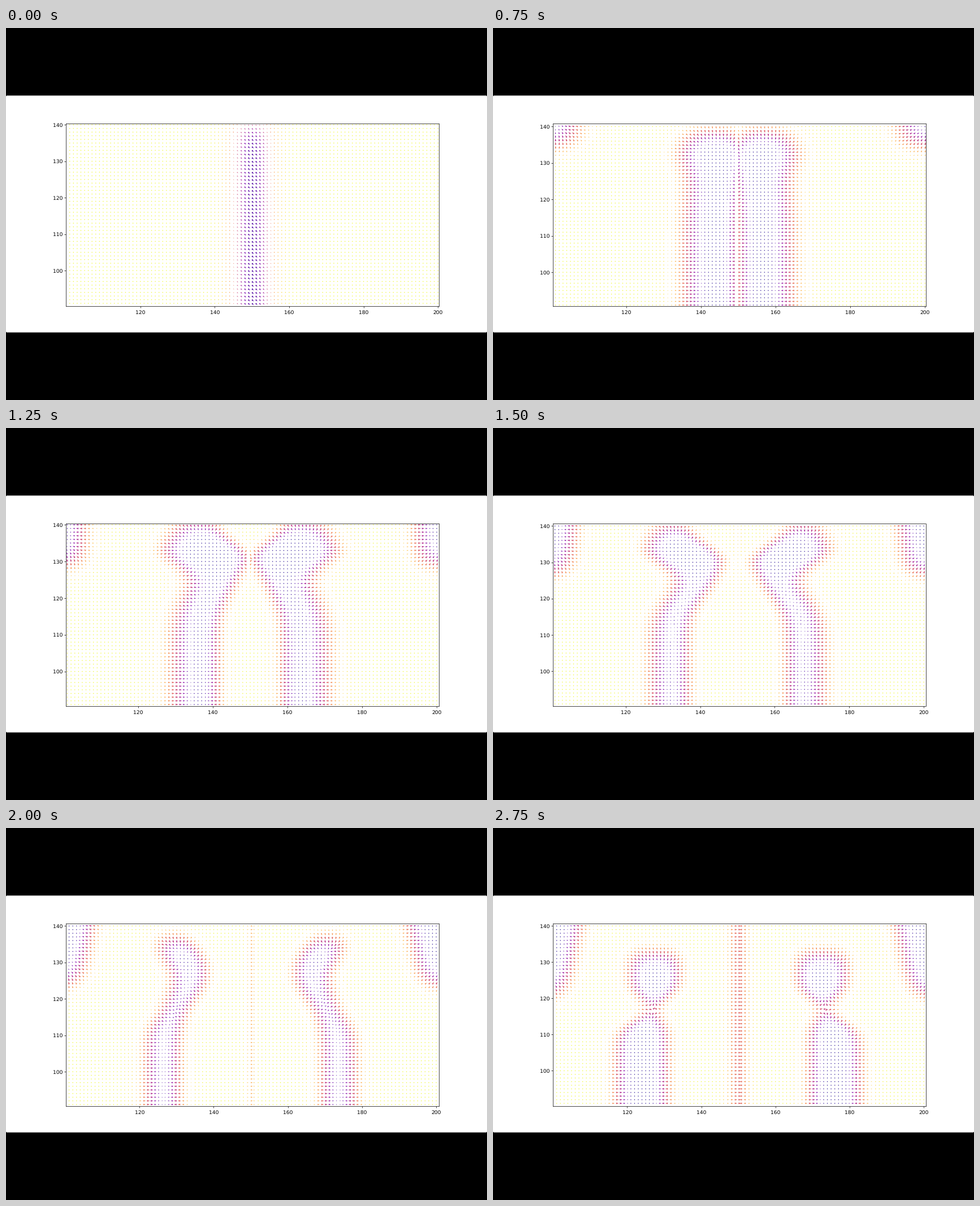
A matplotlib script that plays this animation: 851x658 px, repeating every 3 s.

```python
import numpy as np
import matplotlib.pyplot as plt
from matplotlib.animation import FuncAnimation
from matplotlib.patches import FancyBboxPatch

W, H, DPI = 851, 658, 100
FRAMES, STEP = 12, 250
MAX_ARROW = 4.9  # px
plt.rcParams.update({"font.family": "DejaVu Sans", "text.hinting": "none"})

# The view drifts by thirds of a grid cell around these corners.
VIEW_STEPS = [0, 2, 4, 5, 7, 9, 11]
LEFT, RIGHT = [0, 1, 1, 2, 1, 0, 0], [0, 0, 0, 1, 1, 2, 1]
BOTTOM, TOP = [0, 2, 1, 1, 0, 2, 0], [0, 1, 2, 0, 2, 0, 1]

gx, gy = np.meshgrid(np.arange(101, 201), np.arange(91, 141))
dist = np.abs(gx - 150)  # the pattern mirrors at x = 150


def ramp(x, start, end):
    t = np.clip((x - start) / (end - start), 0, 1)
    return t * t * (3 - 2 * t)


def bump(x, mid, width):
    return np.exp(-((x - mid) / width) ** 2)


def step(z):
    return 1 / (1 + np.exp(-z))


def ridge(i):
    """Two bands that part, bend inwards and finally pinch off a spot."""
    centre = 26 * ramp(i, 0, 10) ** 0.85
    centre = centre - 7 * bump(i, 6.5, 2.3) * bump(gy, 126, 8)
    centre = centre - 3.3 * ramp(i, 6, 9) * step((gy - 114) / 2)
    half = 5 + 1.4 * np.cos(2 * np.pi * (i - 3.3) / 8)
    half = half + 5 * bump(i, 5.3, 2.2) * bump(gy, 132, 5)
    half = half - 5 * ramp(i, 7, 11) * bump(gy, 117, 4.5)
    top = 141 - 8.5 * ramp(i, 5, 11) - 3 * bump(i, 2.3, 1.6)
    soft = 1.7 + 0.7 * bump(i, 4, 2.5)
    return (step((dist - centre + half) / 1.6)
            * step((centre + half - dist) / soft)
            * step((top - gy) / 1.6))


def corner(i):
    low = 117.5 + 32 * np.exp(-i / 5)
    side = 43 + 2.5 * bump(i, 4.5, 1.7) + 0.22 * ramp(i, 5, 7) * (140 - gy)
    soft = 1.8 + 3 * np.exp(-i / 2)
    return step((gy - low) / 1.8) * step((dist - side) / soft)


def axis_stripe(i):
    amp = 0.2 * ramp(i, 5, 7) + 0.18 * ramp(i, 9, 11)
    return amp * bump(dist, 0, 1.5 + 1.7 * ramp(i, 9, 11))


def density(i):
    v = np.maximum(ridge(i) + corner(i), axis_stripe(i))
    return np.clip(1.1 * v, 0, 1)


def arrows(v, i):
    """Arrows follow the slope; at the start they all point down right."""
    dy, dx = np.gradient(v)
    dx = dx + 0.03
    size = MAX_ARROW * 4 * v * (1 - v) / np.hypot(dx, dy)
    diag = MAX_ARROW * v / np.sqrt(2)
    mix = 1 - ramp(i, 0, 2)
    return (size * dx * (1 - mix) + diag * mix,
            size * dy * (1 - mix) - diag * mix)


def limit(base, drift, i):
    return base + 0.32 * np.interp(i, VIEW_STEPS, drift)


fig = plt.figure(figsize=(W / DPI, H / DPI), dpi=DPI, facecolor="black")
fig.add_artist(FancyBboxPatch((0, 119.5), W, 419, transform=None, snap=False,
                              boxstyle="round,pad=0,rounding_size=2",
                              fc="white", ec="none", zorder=-1))
ax = fig.add_axes([106.4 / W, 165.6 / H, 659.1 / W, 323 / H])
ax.set_xticks(range(120, 201, 20))
ax.set_yticks(range(100, 141, 10))
ax.tick_params(labelsize=6.55, length=2.28, width=0.52, pad=2.28)
for spine in ax.spines.values():
    spine.set_linewidth(0.52)

zero = np.zeros(gx.shape)
field = ax.quiver(gx, gy, zero, zero, zero, cmap="plasma_r", width=0.0024,
                  scale=1, scale_units="dots")
field.set_clim(0, 1.03)


def draw(i):
    v = density(i)
    field.set_UVC(*arrows(v, i), v)
    ax.set_xlim(limit(100.04, LEFT, i), limit(200.19, RIGHT, i))
    ax.set_ylim(limit(90.16, BOTTOM, i), limit(140.29, TOP, i))
    return (field,)


anim = FuncAnimation(fig, draw, frames=FRAMES, interval=STEP,
                     init_func=lambda: draw(0), repeat=True, repeat_delay=0)
plt.show()
```
